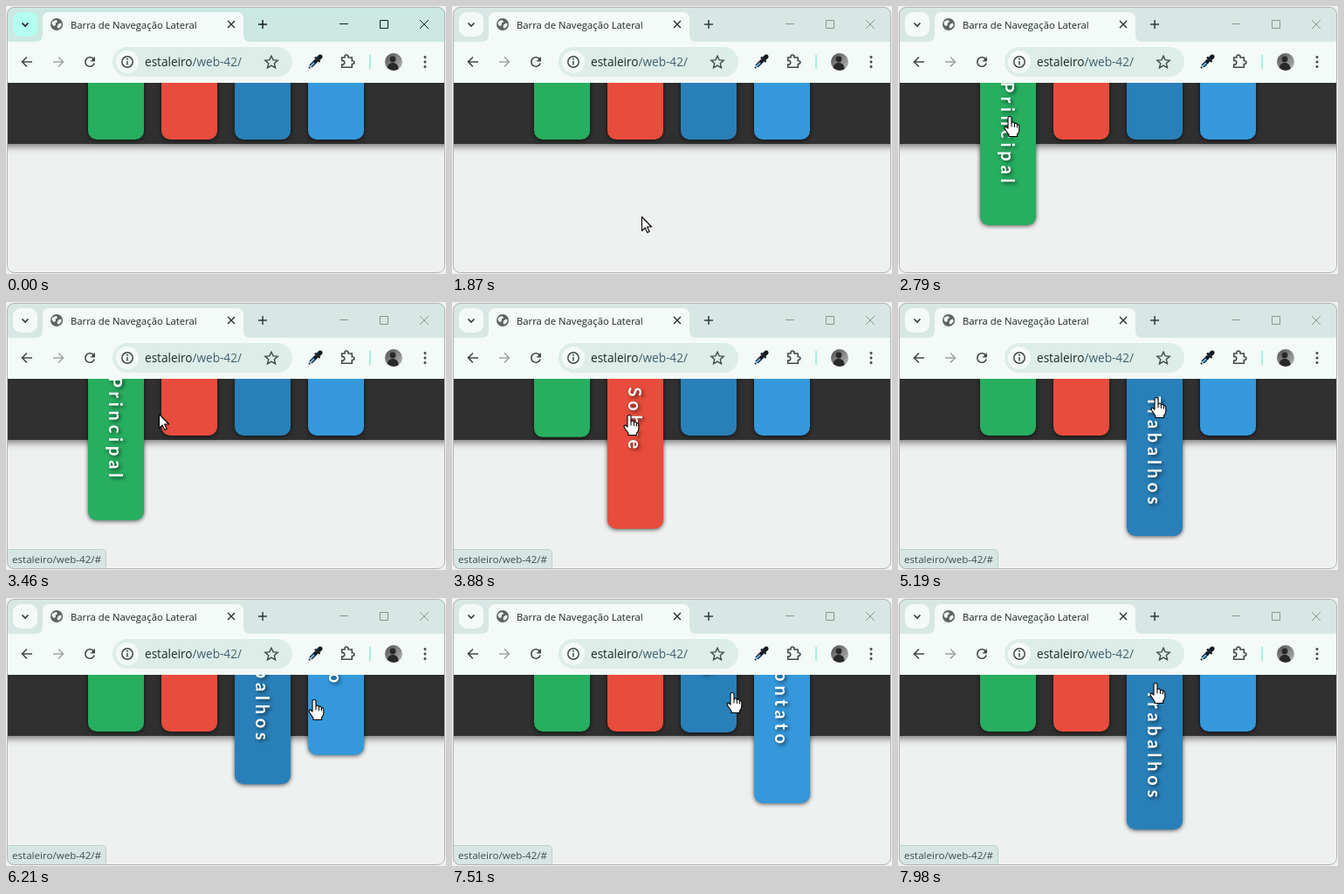
An HTML page with a canvas for the animation above (8 s loop, 504 by 307 pixels).

```html
<!DOCTYPE html>
<html lang="pt-BR">
<head>
<meta charset="utf-8">
<title>Barra de Navegação Lateral</title>
<style>
html, body { margin: 0; width: 100%; height: 100%; overflow: hidden; background: #f1f1f1; }
canvas { display: block; width: 504px; height: 307px; }
</style>
</head>
<body>
<canvas id="stage" width="504" height="307"></canvas>
<script>
const ctx = document.getElementById('stage').getContext('2d');
const LOOP = 8000, SLIDE = 600, REST = 153, TRAVEL = 115;
const UI = '"Open Sans", "Noto Sans", sans-serif';

// moves: times at which the pointer enters and leaves, in turn
const cards = [
  { x: 94, color: '#27ae60', label: 'Principal', moves: [2457, 3380] },
  { x: 178, color: '#e74c3c', label: 'Sobre', moves: [3478, 4480] },
  { x: 262, color: '#2980b9', label: 'Trabalhos', moves: [4530, 6042, 7500] },
  { x: 346, color: '#3498db', label: 'Contato', moves: [6108, 7393] }
];

// Pointer path: time, x, y
const path = [
  [1160, 305, 297], [1210, 265, 268], [1260, 232, 250], [1310, 218, 242], [1455, 218, 242],
  [1460, 217, 241], [1870, 217, 241], [2457, 148, 153], [2640, 128, 128], [2690, 128, 126],
  [3150, 128, 126], [3380, 158, 127], [3478, 178, 128], [3700, 203, 129], [4330, 203, 129],
  [4480, 242, 126], [4530, 262, 122], [4800, 290, 114], [5190, 296, 109], [5400, 308, 104],
  [5600, 314, 102], [6010, 314, 102], [6042, 326, 105], [6108, 346, 112], [6210, 353, 116],
  [6600, 371, 118], [6865, 372, 118], [6870, 376, 118], [6920, 380, 117], [7310, 380, 117],
  [7393, 346, 113], [7495, 326, 109], [7510, 321, 108], [7700, 304, 100], [7980, 295, 97]
];

const arrow = new Path2D('M0.5 0.5V16.5L4.2 13L6.8 18.6L9.2 17.6L6.6 12H11.6Z');
const hand = new Path2D('M-2 13V2Q-2 .5 0 .5Q2 .5 2 2V8Q2.4 6.8 4 7Q5.4 7.2 5.4 9Q6 8 7.2 8.3' +
  'Q8.5 8.6 8.5 10.2Q9 9.4 10 10Q10.8 10.5 10.8 12V16.5Q10.6 19 8.6 21V23.5H-1V21.5L-4.8 16' +
  'Q-6.6 13.4 -5.6 12.4Q-4.4 11.4 -2 14.2Z');

const clamp = v => Math.min(1, Math.max(0, v));
const mix = (a, b, k) => a + (b - a) * k;
const blend = (a, b, k) => `rgb(${a.map((v, i) => Math.round(mix(v, b[i], k)))})`;

// CSS "ease": cubic-bezier(.25, .1, .25, 1)
function ease(x) {
  if (x <= 0) return 0;
  if (x >= 1) return 1;
  const curve = (a, b, u) => 3 * a * u * (1 - u) ** 2 + 3 * b * u * u * (1 - u) + u ** 3;
  let lo = 0, hi = 1;
  for (let i = 0; i < 20; i++) {
    const mid = (lo + hi) / 2;
    if (curve(.25, .25, mid) < x) lo = mid; else hi = mid;
  }
  return curve(.1, 1, lo);
}

function pointerAt(t) {
  if (t < path[0][0]) return null;
  const i = path.findIndex(p => p[0] > t);
  if (i < 0) return path[path.length - 1].slice(1);
  const [a, b] = [path[i - 1], path[i]], k = (t - a[0]) / (b[0] - a[0]);
  return [mix(a[1], b[1], k), mix(a[2], b[2], k)];
}

function box(x, y, w, h, r, fill) {
  ctx.beginPath();
  ctx.roundRect(x, y, w, h, r);
  ctx.fillStyle = fill;
  ctx.fill();
}

function disc(x, y, r, fill) {
  ctx.beginPath();
  ctx.arc(x, y, r, 0, 7);
  ctx.fillStyle = fill;
  ctx.fill();
}

function line(d, color, width = 1.5) {
  ctx.strokeStyle = color;
  ctx.lineWidth = width;
  ctx.stroke(new Path2D(d));
}

function shape(d, fill) {
  ctx.fillStyle = fill;
  ctx.fill(new Path2D(d));
}

function text(s, x, y, size, color) {
  ctx.font = `${size}px ${UI}`;
  ctx.fillStyle = color;
  ctx.fillText(s, x, y);
  return x + ctx.measureText(s).width;
}

function shadow(color, blur, dx, dy) {
  ctx.shadowColor = color;
  ctx.shadowBlur = blur;
  ctx.shadowOffsetX = dx;
  ctx.shadowOffsetY = dy;
}

function drawTabs(k) {
  const ink = blend([24, 32, 30], [48, 58, 56], k);
  const caption = blend([20, 26, 25], [139, 148, 145], k);
  ctx.fillStyle = blend([203, 232, 226], [215, 231, 227], k);
  ctx.fillRect(0, 0, 504, 42);
  box(8, 7, 28, 28, 9, blend([179, 255, 240], [243, 250, 248], k));
  line('M18.5 19.5L22 23L25.5 19.5', ink, 1.7);
  shape('M34 41Q42 41 42 33V15Q42 7 50 7H264Q272 7 272 15V33Q272 41 280 41V42H34Z', '#f3faf8');

  disc(58, 21, 7, '#5a6462');
  shape('M53 18Q55 16 58 16.2L59 18L56.5 20L57 22L54.5 23L52.5 20.5ZM60 20.5L63 19.5' +
    'L63.6 22L61.5 25L59 25.5L58.6 23Z', '#f3faf8');
  text('Barra de Navegação Lateral', 74, 25.5, 11.3, '#1c2624');
  line('M254 17L262 25M262 17L254 25', '#26302e', 1.4);
  line('M289 21H299M294 16V26', ink, 1.5);
  line('M382 20.5H392M428.5 16.5H437.5V25.5H428.5ZM474 16L484 26M484 16L474 26', caption, 1);
}

function drawToolbar() {
  const ink = '#3f4947';
  ctx.fillStyle = '#f3faf8';
  ctx.fillRect(0, 41, 504, 47);
  line('M30 64H19M24 58.5L18.5 64L24 69.5', ink, 1.6);
  line('M54 64H65M60 58.5L65.5 64L60 69.5', '#9ca5a2', 1.6);
  line('M100.5 61A5.3 5.3 0 1 0 101.2 65.5', ink, 1.6);
  shape('M102 58V63.5H96.5Z', ink);

  box(122, 47, 206, 34, 17, '#ddede8');
  disc(139, 64, 13, '#f3faf8');
  line('M145.2 64A6.2 6.2 0 1 1 132.8 64A6.2 6.2 0 1 1 145.2 64M139 63V67.5', ink, 1.5);
  disc(139, 60.8, 1, ink);
  const x = text('estaleiro', 159, 69, 13.6, '#1b2826');
  text('/web-42/', x, 69, 13.6, '#41606d');
  line('M304 57.2L306.1 61.9L311.2 62.4L307.3 65.8L308.5 70.8L304 68.1L299.5 70.8L300.7 65.8L296.8 62.4L301.9 61.9Z', ink, 1.4);

  // eyedropper
  line('M349 69L356 62', '#101820', 4.4);
  line('M348.2 69.8L353 65', '#64b2f0', 2);
  line('M347 71.2L348 70', '#101820', 2);
  line('M354 58.5L359.5 64', '#101820', 2.4);
  line('M357.5 60.5L360 58', '#101820', 5);
  disc(360, 58, 2.5, '#101820');

  // extensions
  line('M384.7 59H388V58A2 2 0 0 1 392 58V59H396.3V62.7H397A1.9 1.9 0 0 1 397 66.5H396.3V70.3' +
    'H384.7V67H385.5A2.2 2.2 0 0 0 385.5 62.4H384.7Z', ink, 1.6);
  ctx.fillStyle = '#a6efe3';
  ctx.fillRect(416, 56, 2, 16);

  // profile picture
  ctx.save();
  ctx.beginPath();
  ctx.arc(444, 64, 10, 0, 7);
  ctx.clip();
  const g = ctx.createLinearGradient(434, 54, 454, 74);
  g.addColorStop(0, '#4c4c4c');
  g.addColorStop(.55, '#8b8d8c');
  g.addColorStop(1, '#b9bcba');
  ctx.fillStyle = g;
  ctx.fillRect(434, 54, 20, 20);
  disc(443, 61, 3.4, '#292929');
  shape('M436 75Q436 65 443 65Q450 65 450 75Z', '#292929');
  ctx.restore();

  for (const y of [58.5, 64, 69.5]) disc(480, y, 1.5, ink);
}

function drawCard(card, t) {
  const p = card.moves.reduce((sum, at, i) => sum + (i % 2 ? -1 : 1) * ease((t - at) / SLIDE), 0);
  const bottom = REST + TRAVEL * p;
  ctx.save();
  shadow('rgba(0,0,0,.65)', 5, 0, 1);
  box(card.x, 60, 64, bottom - 60, 10, card.color);
  shadow('rgba(0,0,0,.6)', 4, 2, 2);
  ctx.translate(card.x + 24, bottom - 160 - 30 * (1 - p));
  ctx.rotate(Math.PI / 2);
  ctx.font = '700 20px Lato, sans-serif';
  ctx.letterSpacing = '4.8px';
  ctx.fillStyle = '#fff';
  if (p > 0) ctx.fillText(card.label, 0, 0);
  ctx.restore();
}

function drawPage(t) {
  ctx.save();
  ctx.beginPath();
  ctx.rect(0, 88, 504, 219);
  ctx.clip();
  ctx.fillStyle = '#eff0f0';
  ctx.fillRect(0, 88, 504, 219);
  ctx.save();
  shadow('rgba(0,0,0,.6)', 9, 0, 2);
  ctx.fillStyle = '#2f302f';
  ctx.fillRect(-10, 70, 524, 88);
  ctx.restore();
  cards.forEach(card => drawCard(card, t));
  ctx.restore();
}

function drawStatus(t) {
  ctx.save();
  ctx.globalAlpha = clamp((t - 2840) / 160);
  box(0, 283, 115, 24, [0, 5, 0, 0], '#c3d0cd');
  box(0, 284, 114, 23, [0, 4, 0, 0], '#d6e7e3');
  text('estaleiro/web-42/#', 7, 299, 11.6, '#3c4c50');
  ctx.restore();
}

function drawPointer(t) {
  const pos = pointerAt(t);
  if (!pos) return;
  const [x, y] = pos.map(Math.round);
  const over = y <= REST && cards.some(c => x >= c.x && x <= c.x + 64);
  ctx.save();
  ctx.translate(x, y);
  ctx.fillStyle = '#fff';
  ctx.strokeStyle = '#000';
  ctx.lineWidth = 1.1;
  ctx.lineJoin = 'round';
  const icon = over ? hand : arrow;
  ctx.fill(icon);
  ctx.stroke(icon);
  if (over) line('M2 8V12.5M5.4 9V13M8.5 10.2V13.5', '#000', 1);
  ctx.restore();
}

function draw(t) {
  const inactive = t < 190 ? 0 : t < 260 ? .5 : 1;
  ctx.fillStyle = '#f1f1f1';
  ctx.fillRect(0, 0, 504, 307);
  ctx.save();
  ctx.beginPath();
  ctx.roundRect(1, 1, 502, 305, 8);
  ctx.clip();
  drawTabs(inactive);
  drawToolbar();
  drawPage(t);
  drawStatus(t);
  ctx.restore();
  ctx.beginPath();
  ctx.roundRect(1.5, 1.5, 501, 304, 8);
  ctx.strokeStyle = '#aeb3b2';
  ctx.lineWidth = 1;
  ctx.stroke();
  drawPointer(t);
}

const start = performance.now();
function tick() {
  draw((performance.now() - start) % LOOP);
  requestAnimationFrame(tick);
}
tick();
</script>
</body>
</html>
```
